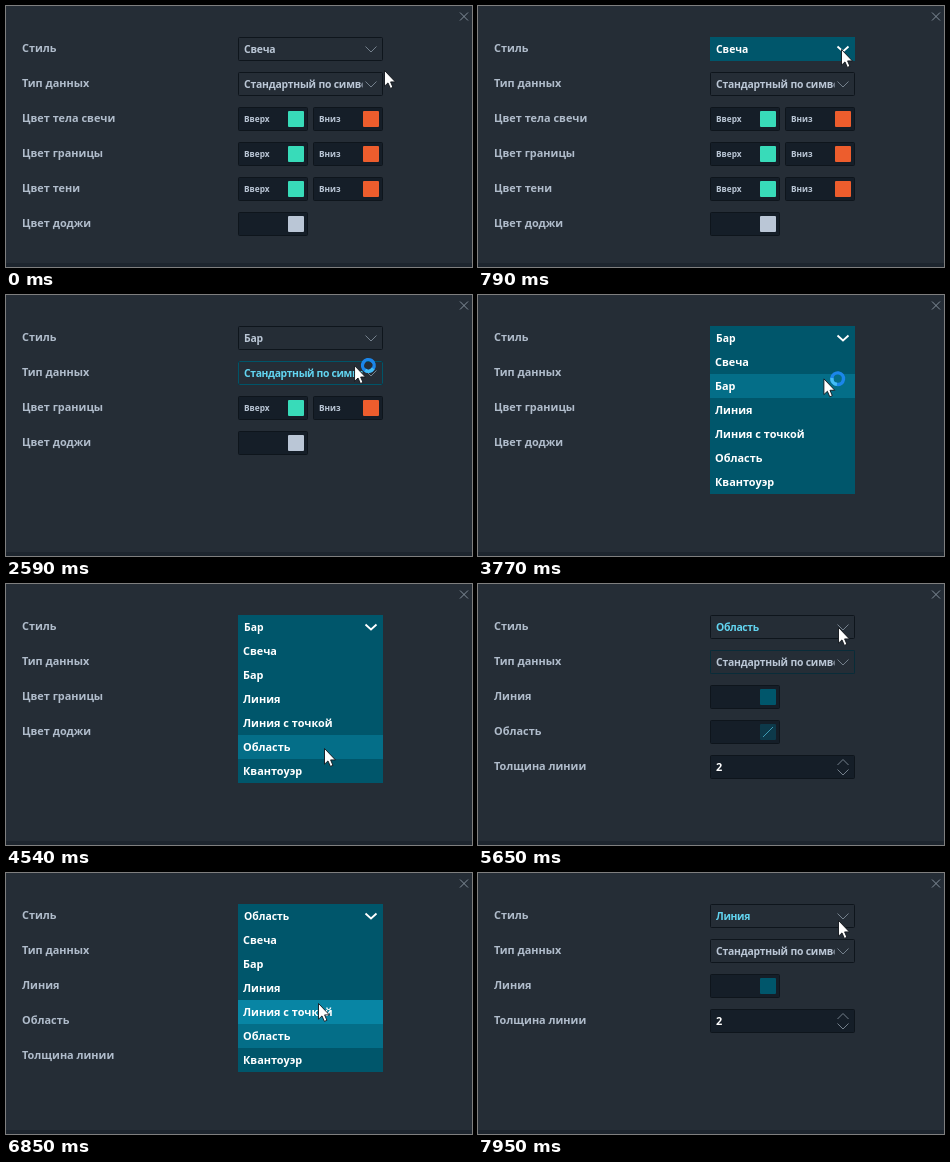
Animation of 466 by 261 pixels, one loop 8000 ms. Source, as an HTML page:

```html
<!DOCTYPE html>
<html lang="ru">
<head>
<meta charset="utf-8">
<style>
html, body { margin: 0; width: 100%; height: 100%; overflow: hidden; background: #252d36; }
svg { display: block; }
#stage { width: 100vw; height: 100vh; font-family: "Noto Sans", "Open Sans", sans-serif; font-weight: 600; }
.label { font-size: 10.9px; fill: #b0bccb; }
.value { font-size: 10.4px; letter-spacing: -.2px; fill: #bac6d5; }
.hot { font-weight: 700; letter-spacing: -.35px; fill: #62d4f0; }
.open { letter-spacing: 0; fill: #fff; }
.item { font-size: 10.9px; fill: #fff; }
.small { font-size: 8.3px; fill: #bac6d5; }
.line { fill: none; stroke: #74808c; }
</style>
</head>
<body>
<svg id="stage" viewBox="0 0 466 261"></svg>
<script>
const LOOP = 8000;
const STYLES = ['Свеча', 'Бар', 'Линия', 'Линия с точкой', 'Область', 'Квантоуэр'];
const TEAL = '#00566b', PALE = '#bac6d6';

// Fields below the two selects, for each chart style
const pair = ['#38dbb9', '#ed5d2d'];
const doji = ['Цвет доджи', [PALE]];
const border = ['Цвет границы', pair];
const stroke = ['Линия', [TEAL]];
const width = ['Толщина линии', 'number'];
const FORMS = {
  'Свеча': [['Цвет тела свечи', pair], border, ['Цвет тени', pair], doji],
  'Бар': [border, doji],
  'Область': [stroke, ['Область', ['area']], width],
  'Линия': [stroke, width]
};

// Each menu visit: header lights up, list drops, item is pressed
const VISITS = [
  { head: 790, list: 1090, press: 2110, pick: 'Бар' },
  { head: 3300, list: 3440, press: 4540, pick: 'Область' },
  { head: 5820, list: 6050, press: 7080, pick: 'Линия' }
];
const CLOSE = 130, REBUILD = 210;   // delays after a press

// Pointer sweeps: each curves from the last place past a bend to its end
const HOME = [378, 64];
const SWEEPS = [
  { from: 70, to: 630, bend: [396, -5], end: [363, 43] },
  { from: 1400, to: 1880, bend: [316, 97], end: [326, 87] },
  { from: 2500, to: 3000, bend: [373, 54], end: [361, 45] },
  { from: 3690, to: 4320, bend: [322, 139], end: [318, 164] },
  { from: 5010, to: 5650, bend: [372, 100], end: [360, 43] },
  { from: 6200, to: 6680, bend: [330, 95], end: [312, 130] },
  { from: 6920, to: 6920, bend: [311, 120], end: [311, 120] },
  { from: 7570, to: 7950, bend: [360, 70], end: [360, 47] }
];

// The pointer advances in steps of about 77 ms
function pointer(t) {
  let pos = HOME;
  for (const { from, to, bend, end } of SWEEPS) {
    if (t < from) break;
    const n = Math.round((to - from) / 77);
    const k = Math.floor((t - from) / (to - from || 1) * n + .2);
    const u = Math.min(1, (k + 1) / (n + 1)), v = 1 - u;
    pos = pos.map((p, i) => v * v * p + 2 * u * v * bend[i] + u * u * end[i]);
  }
  return pos;
}

const over = ([x, y], top) => x >= 232 && x < 377 && y >= top && y < top + 24;

// Share of the last 160 ms spent hovering: the border fades with it
function glow(t, top) {
  let sum = 0;
  for (let i = 0; i < 16; i++) sum += over(pointer(t - i * 10), top);
  return sum / 16;
}

const rect = (x, y, w, h, fill, more = '') =>
  `<rect x="${x}" y="${y}" width="${w}" height="${h}" fill="${fill}" ${more}/>`;
const text = (x, y, cls, s) => `<text x="${x}" y="${y}" class="${cls}">${s}</text>`;
const line = (d, more = '') => `<path d="${d}" class="line" ${more}/>`;
const box = (x, y, w, fill = '#151e28') =>
  rect(x + .5, y + .5, w - 1, 23, fill, 'stroke="#0e151c" rx="1"');

function select(y, value, hot, lit) {
  return box(232, y, 145, '#252d36') +
    rect(232.5, y + .5, 144, 23, 'none', `stroke="#005468" rx="1" opacity="${lit}"`) +
    `<svg x="232" y="${y}" width="124.5" height="24">${text(6, 16, hot ? 'value hot' : 'value', value)}</svg>` +
    line(`M359.5 ${y + 9.5}l5.5 5.5 5.5-5.5`);
}

function swatch(x, y, color, name) {
  const area = color === 'area';
  return box(x, y, 70) + (name ? text(x + 6, y + 15, 'small', name) : '') +
    rect(x + 50, y + 4, 16, 16, area ? '#0d394a' : color, 'rx="1"') +
    (area ? line(`M${x + 53} ${y + 17}l10-10`, 'style="stroke:#3d9ab2"') : '');
}

function field(y, kind) {
  if (kind !== 'number')
    return kind.map((c, i) => swatch(232 + 75 * i, y, c, kind[1] && ['Вверх', 'Вниз'][i])).join('');
  return box(232, y, 145) + text(238, y + 16, 'item', '2') +
    line(`M359.5 ${y + 10}l5.5-5.5 5.5 5.5M359.5 ${y + 14.5}l5.5 5.5 5.5-5.5`);
}

function menu(current, chosen, pos, listed) {
  let s = rect(232, 31, 145, 24, TEAL) + text(238, 47, 'value open', current) +
    line('M359.5 40.5l5.5 5 5.5-5', 'style="stroke:#fff;stroke-width:1.8"');
  if (!listed) return s;
  STYLES.forEach((name, i) => {
    const y = 55 + 24 * i;
    s += rect(232, y, 145, 24, name === chosen ? '#046e88' : over(pos, y) ? '#0885a4' : TEAL) +
      text(237, y + 16, 'item', name);
  });
  return s;
}

function cursor([x, y], busy, t) {
  const ring = `<g fill="none" stroke-width="3.4" transform="translate(14.3 .3) rotate(${t * .36})">
    <circle r="5.8" stroke="#1b86ea"/><path d="M-5.8 0A5.8 5.8 0 0 1 0-5.8" stroke="#43bdf5"/></g>`;
  return `<g transform="translate(${x} ${y})">${busy ? ring : ''}
    <path d="M.5.5V16.2L4 12.9 6.4 18.4 8.9 17.3 6.6 11.9H11.4Z" fill="#fff" stroke="#10151a" stroke-width=".9"/></g>`;
}

function scene(t) {
  const pos = pointer(t);
  let style = STYLES[0], form = style, chosen = style, active;
  for (const { head, list, press, pick } of VISITS) {
    if (t >= press) chosen = pick;
    if (t >= press + CLOSE) style = pick;
    if (t >= press + REBUILD) form = pick;
    if (t >= head && t < press + CLOSE) active = { listed: t >= list };
  }
  const listed = active && active.listed;
  let s = rect(0, 0, 466, 261, '#252d36') + rect(0, 257, 466, 4, '#1d252e') +
    line('M454 6.5l8 8M462 6.5l-8 8', 'style="stroke:#84909c"') +
    text(16, 46, 'label', 'Стиль') + text(16, 81, 'label', 'Тип данных') +
    select(31, style, over(pos, 31), glow(t - 20, 31)) +
    select(66, 'Стандартный по символу', !listed && over(pos, 66), listed ? 0 : glow(t, 66));
  FORMS[form].forEach(([name, kind], i) => {
    const y = 101 + 35 * i;
    s += text(16, y + 15, 'label', name) + field(y, kind);
  });
  if (active) s += menu(style, chosen, pos, listed);
  return s + cursor(pos, t >= 2350 && t < 4150, t);
}

const stage = document.getElementById('stage');
const begin = performance.now();
let last;
function draw() {
  const next = scene((performance.now() - begin) % LOOP);
  if (next !== last) stage.innerHTML = last = next;
  requestAnimationFrame(draw);
}
draw();
</script>
</body>
</html>
```
